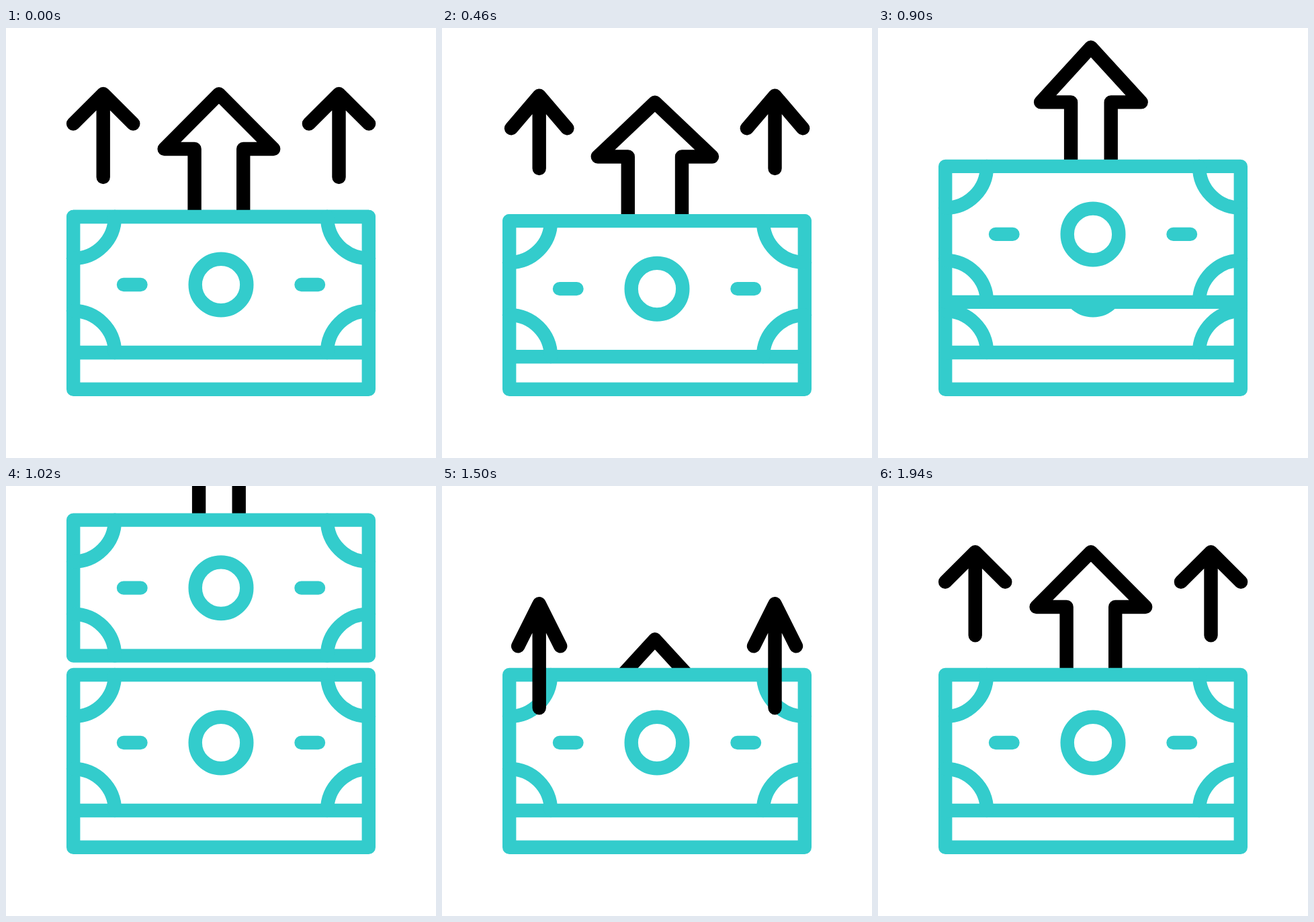
Recreate the animation shown at these times as an HTML page. Size 640 px wide and 640 px high, loop 2.42 s.

```html
<!DOCTYPE html>
<html lang="en">
<head>
<meta charset="utf-8">
<title>Money rising</title>
<style>
  html, body { margin: 0; width: 100%; height: 100%; overflow: hidden; background: #fff; }
  svg { display: block; width: 100%; height: 100%; }
  g, path { stroke-width: 20.4; stroke-linecap: round; stroke-linejoin: round; fill: none; }
  .teal { stroke: #33cccc; }
  .black { stroke: #000; }
</style>
</head>
<body>
<svg viewBox="0 0 640 640">
  <defs>
    <g id="bill">
      <rect x="100.2" y="281" width="439.6" height="202" fill="#fff"/>
      <path d="M162 281A62 62 0 0 1 100 343M478 281A62 62 0 0 0 540 343M162 483A62 62 0 0 0 100 421M478 483A62 62 0 0 1 540 421"/>
      <circle cx="320" cy="382" r="38.3"/>
      <path d="M175 382H200.5M439.5 382H465"/>
    </g>
  </defs>
  <path id="newArrow" class="black"/>
  <g class="teal">
    <path d="M100.2 483V537.7H539.8V483" fill="#fff"/>
    <use id="back" href="#bill"/>
  </g>
  <path id="oldArrow" class="black"/>
  <use id="front" class="teal" href="#bill"/>
  <path id="sides" class="black"/>
</svg>
<script>
  const LOOP = 2420, STEP = 20;
  const el = id => document.getElementById(id);
  const clamp = u => Math.min(1, Math.max(0, u));
  const mix = (a, b, u) => a + (b - a) * u;

  // Eased progress from time a to time b
  function smooth(t, a, b) {
    const u = clamp((t - a) / (b - a));
    return u * u * (3 - 2 * u);
  }

  // Linear track through [time, value] points
  function track(t, points) {
    for (let i = 1; i < points.length; i++) {
      const [a, v] = points[i - 1], [b, w] = points[i];
      if (t <= b) return mix(v, w, clamp((t - a) / (b - a)));
    }
    return points[points.length - 1][1];
  }

  const launch = [[420, 222], [460, 209], [540, 162], [640, 91], [740, 5], [860, -110]];

  function sideArrow(x, tip, length, stretch) {
    const half = mix(44.6, 31.5, stretch), wing = tip + mix(44.5, 63, stretch);
    return `M${x - half} ${wing}L${x} ${tip}L${x + half} ${wing}M${x} ${tip}V${tip + length}`;
  }

  function drawSides(t) {
    let tip, length, stretch;
    if (t < 1000) {
      stretch = clamp((t - 420) / 180);
      length = mix(mix(124, 95, smooth(t, 0, 420)), 155, stretch);
      tip = track(t, launch) - length;
    } else {
      stretch = 1 - smooth(t, 1500, 1700);
      length = mix(124, 155, stretch);
      tip = 98.3 + 516 * Math.pow(Math.max(0, 1700 - t) / 540, 1.915);
    }
    el("sides").setAttribute("d",
      sideArrow(144.7, tip, length, stretch) + sideArrow(495.5, tip, length, stretch));
  }

  function bigArrow(dy, widen, billTop) {
    const x = 316.9, tip = 98.3 + dy, base = tip + 81.7 - 0.25 * Math.max(0, widen);
    const wing = 81.3 + widen, shaft = 36.3 + widen, foot = Math.max(base, billTop);
    return `M${x - shaft} ${foot}V${base}H${x - wing}L${x} ${tip}L${x + wing} ${base}H${x + shaft}V${foot}`;
  }

  function drawCentre(t) {
    const dip = smooth(t, 300, 740), rise = smooth(t, 740, 900);
    const billY = 15 * smooth(t, 240, 740) - 507 * Math.pow(Math.max(0, t - 740) / 420, 1.79);
    const move = y => `translate(0 ${y})`;
    el("front").setAttribute("transform", move(billY));
    el("back").setAttribute("transform", move(Math.max(0, billY)));

    const lag = t < 740 ? 41.5 * dip - billY : mix(26.5, 5.5, rise);
    el("oldArrow").setAttribute("d",
      bigArrow(billY + lag, mix(12.7 * dip, -6.5, rise), 281 + billY));

    const left = Math.max(0, 1940 - t) / 440;
    el("newArrow").setAttribute("d", t < 1300 ? "" :
      bigArrow(130 * left * left, -6.5 * (1 - smooth(t, 1500, 1940)), 281));
  }

  const start = performance.now();
  function frame() {
    const t = Math.floor((performance.now() - start) % LOOP / STEP) * STEP;
    drawSides(t);
    drawCentre(t);
    requestAnimationFrame(frame);
  }
  frame();
</script>
</body>
</html>
```
